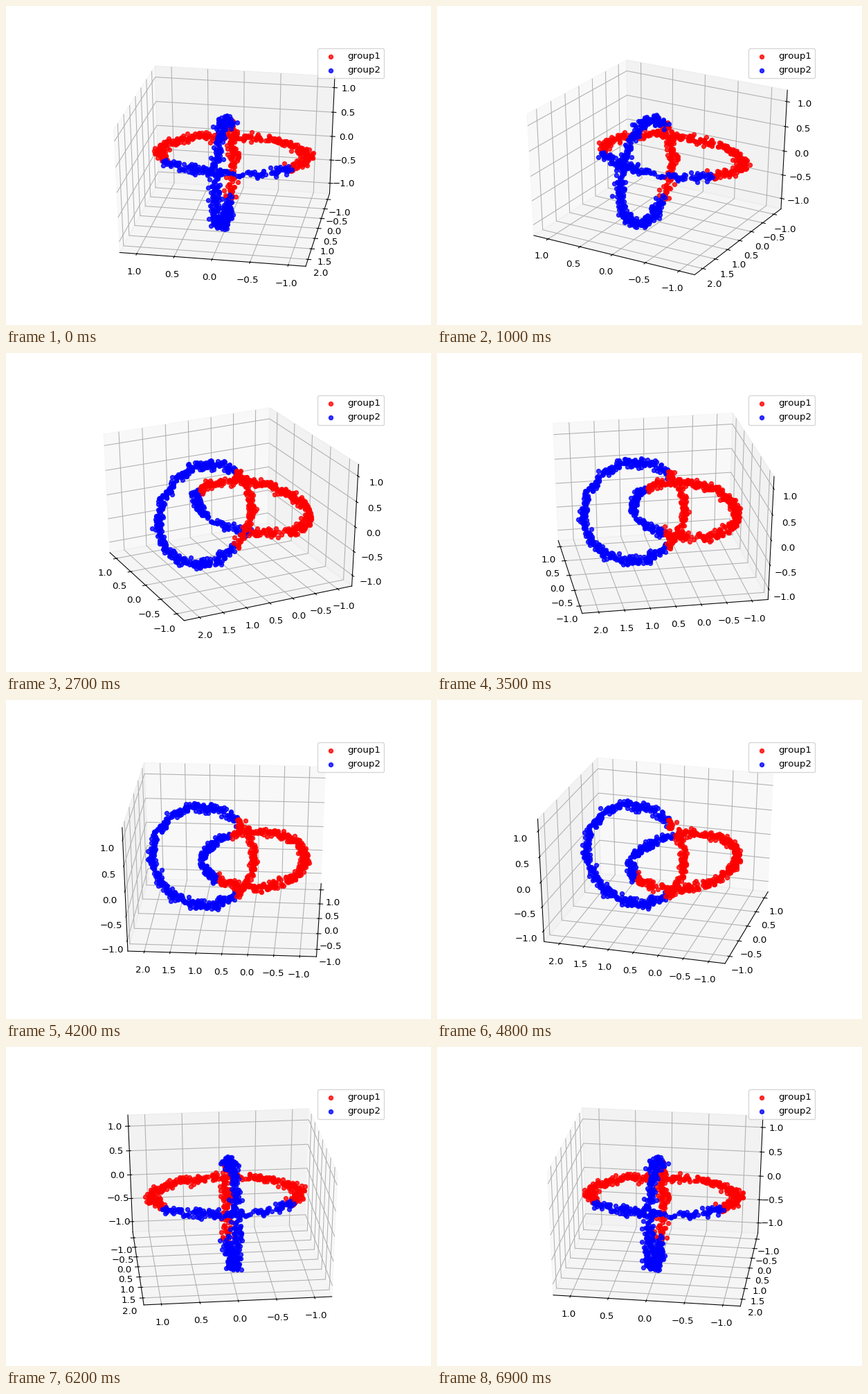
A matplotlib script that plays this animation: 614 by 460 pixels, repeating every 7 s.

```python
import math

import matplotlib.pyplot as plt
import numpy as np
from matplotlib.animation import FuncAnimation

W, H, DPI = 614, 460, 96
FRAMES, INTERVAL = 70, 100
AZIM_MIN, AZIM_STEP, AZIM_SHIFT = 70, 2, 15

POINTS = 480
NOISE = 0.04

# Classic glyph spacing in the labels.
plt.rcParams["text.kerning_factor"] = 6


def ring(rng, center, u, v):
    """Noisy unit circle spanned by the axes u and v."""
    t = rng.uniform(0, 2 * np.pi, POINTS)[:, None]
    circle = np.array(center) + np.cos(t) * np.array(u) + np.sin(t) * np.array(v)
    return circle + rng.normal(0, NOISE, (POINTS, 3))


def make_groups():
    """Two linked rings, each cut in two by its y coordinate."""
    rng = np.random.default_rng(7)
    flat = ring(rng, (0, 0, 0), (1, 0, 0), (0, 1, 0))
    upright = ring(rng, (0, 1, 0), (0, 1, 0), (0, 0, 1))
    flat_far = flat[:, 1] > 0.575 - 0.03 * flat[:, 0]
    upright_far = upright[:, 1] > 0.34
    group1 = np.vstack([flat[~flat_far], upright[~upright_far]])
    group2 = np.vstack([flat[flat_far], upright[upright_far]])
    return group1, group2


fig = plt.figure(figsize=(W / DPI, H / DPI), dpi=DPI, facecolor="white")
ax = fig.add_axes(
    [76.8 / W, 50.69 / H, 476.16 / W, 354.82 / H], projection="3d"
)

# Let the cube stretch with the wide axes instead of forcing a square.
ax.apply_aspect = lambda position=None: None
ax.set_box_aspect((1, 1, 1), zoom=math.sqrt(3) / 1.8294640721620434)

for points, color, name in zip(make_groups(), ("red", "blue"), ("group1", "group2")):
    ax.scatter(*points.T, c=color, alpha=0.8, depthshade=False, label=name)

ax.set_xlim(-1.227, 1.227)
ax.set_ylim(-1.32, 2.32)
ax.set_zlim(-1.225, 1.225)
ax.set_xticks(np.arange(-1, 1.1, 0.5))
ax.set_yticks(np.arange(-1, 2.1, 0.5))
ax.set_zticks(np.arange(-1, 1.1, 0.5))
ax.legend(loc="upper right")


def update(i):
    step = (i + AZIM_SHIFT) % FRAMES
    ax.view_init(elev=30, azim=AZIM_MIN + AZIM_STEP * step)
    return []


anim = FuncAnimation(fig, update, frames=FRAMES, interval=INTERVAL, repeat=True)
plt.show()
```
